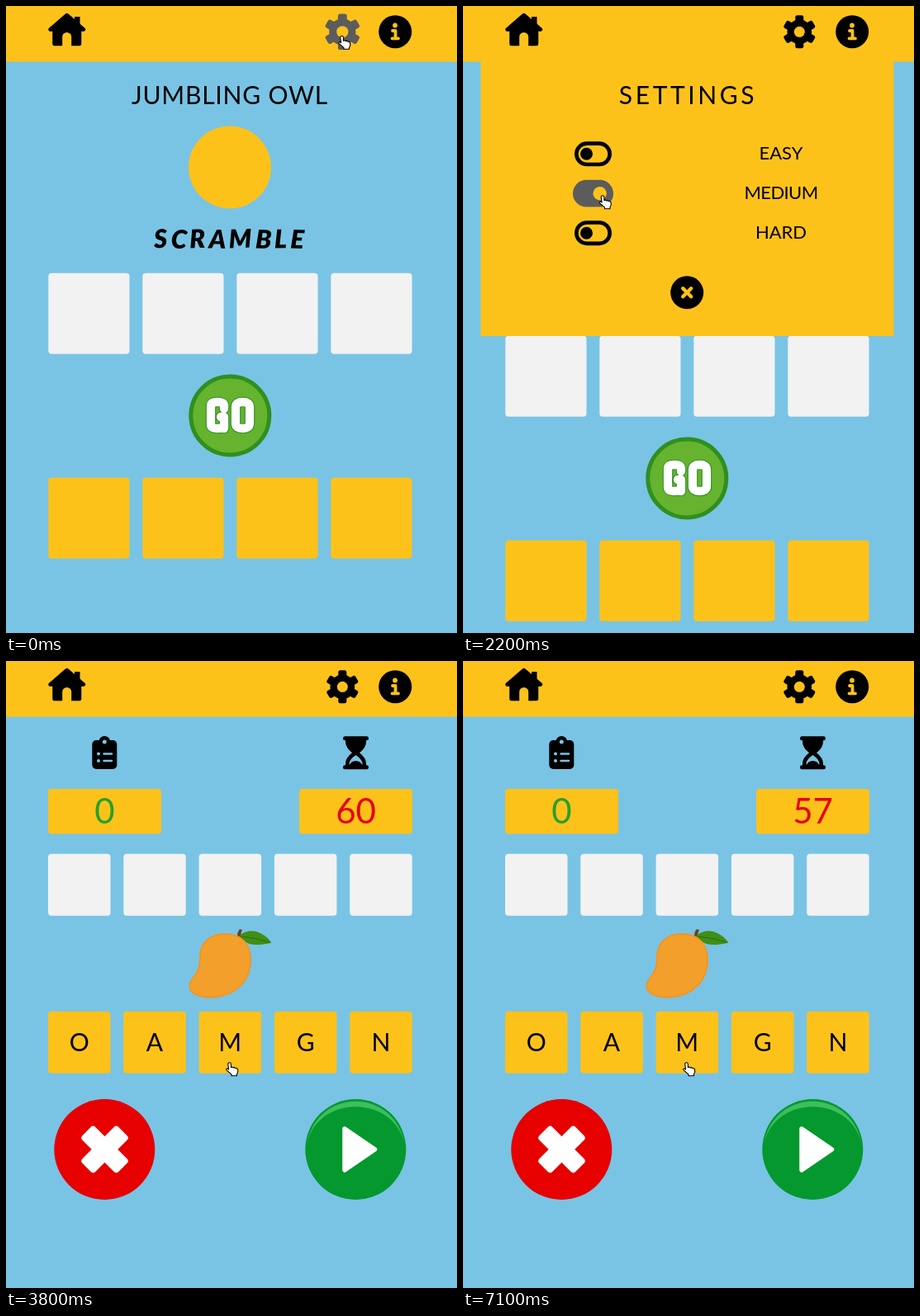
These frames come from a looping animation (546 by 760 pixels, 7200 ms). An HTML page:

```html
<!DOCTYPE html>
<html lang="en">
<head>
<meta charset="utf-8">
<title>Word scramble</title>
<style>
  html, body { margin: 0; width: 100%; height: 100%; overflow: hidden; background: #79c4e5; }
  svg { display: block; width: 546px; height: 760px; }
  text { font-family: Lato, "Open Sans", sans-serif; text-anchor: middle; }
  .amber { fill: #fdc21a; }
  .sky { fill: #79c4e5; }
  .pale { fill: #f2f2f2; }
  .heading { font-size: 30px; }
  .option { font-size: 22px; }
  .count { font-size: 42px; }
  .letter { font-size: 30px; }
  .brush { font-size: 31px; font-weight: 900; font-style: italic; letter-spacing: 3.9px; }
  .line { fill: none; stroke-linecap: round; stroke-linejoin: round; }
  .dim { color: #5c5c5c; }
</style>
</head>
<body>
<svg viewBox="0 0 546 760">
  <defs>
    <rect id="tooth" x="-5" y="-20" width="10" height="12" rx="2.5"/>
    <g id="gear" fill="currentColor">
      <circle r="14.8"/>
      <use href="#tooth"/>
      <use href="#tooth" transform="rotate(60)"/>
      <use href="#tooth" transform="rotate(120)"/>
      <use href="#tooth" transform="rotate(180)"/>
      <use href="#tooth" transform="rotate(240)"/>
      <use href="#tooth" transform="rotate(300)"/>
      <circle class="amber" r="6.5"/>
    </g>
    <g id="off">
      <rect class="line" x="-20.2" y="-12.7" width="40.4" height="25.4" rx="12.7" stroke="currentColor" stroke-width="4.6"/>
      <circle cx="-8" r="7.5" fill="currentColor"/>
    </g>
    <g id="on">
      <rect x="-22.5" y="-15" width="45" height="30" rx="15" fill="currentColor"/>
      <circle class="amber" cx="7.5" r="7.5"/>
    </g>
    <g id="close">
      <circle r="20" fill="currentColor"/>
      <path class="line" d="M-5-5 5 5M5-5-5 5" stroke="#fdc21a" stroke-width="4.4"/>
    </g>
    <rect id="big" width="98.2" height="98" rx="4"/>
    <g id="row">
      <use href="#big" x="51.3"/><use href="#big" x="165.3"/>
      <use href="#big" x="279.3"/><use href="#big" x="393.3"/>
    </g>
    <rect id="small" width="75.5" height="75" rx="4"/>
    <path id="go" class="line" d="M264 488v-3q0-5-8-5t-8 5v22q0 5 8 5t8-5v-9h-4M264 500v12M278 486q0-6 8.5-6t8.5 6v20q0 6-8.5 6t-8.5-6z"/>
    <g id="board">
      <use href="#row" class="pale" y="323.7"/>
      <circle cx="271.3" cy="496.5" r="47.5" fill="#65b32e" stroke="#2f8f1f" stroke-width="5"/>
      <use href="#go" stroke="#2f8f1f" stroke-width="12.5"/>
      <use href="#go" stroke="#fff" stroke-width="10.3"/>
      <use href="#row" class="amber" y="571.7"/>
    </g>
  </defs>

  <rect class="sky" width="546" height="760"/>
  <rect class="amber" width="546" height="67.6"/>

  <!-- Header icons -->
  <path d="M53.5 28.5 73.7 11 94 28.5h-5V46H58.5V28.5z" stroke="#000" stroke-width="4.5" stroke-linejoin="round"/>
  <path d="M83 13h6.5v12H83z"/>
  <path class="amber" d="M68.2 49V37.5a5.5 5.5 0 0 1 11 0V49z"/>
  <use href="#gear" transform="translate(407.3 31.3)" data-show="1500 7200"/>
  <use href="#gear" class="dim" transform="translate(407.3 31.3) scale(1.09)" data-show="0 1500"/>
  <circle cx="471.2" cy="31.2" r="20"/>
  <circle class="amber" cx="471" cy="23.5" r="2.9"/>
  <path class="line" d="M468 30h3.5v9.3M467.5 39.3h7.5" stroke="#fdc21a" stroke-width="3.8"/>

  <!-- Start screen -->
  <g data-show="0 3800">
    <text class="heading" x="271" y="119" letter-spacing=".8">JUMBLING OWL</text>
    <circle class="amber" cx="271" cy="195.5" r="50"/>
    <text class="brush" x="272" y="293.5" rotate="-3 2 -2 1 -2 2 -1 2">SCRAMBLE</text>
  </g>
  <use href="#board" data-show="0 1000 3000 3800"/>
  <use href="#board" y="76" data-show="1000 3000"/>

  <!-- Settings panel -->
  <g data-show="1000 3000">
    <rect class="amber" x="21.5" y="67" width="500" height="333"/>
    <text class="heading" x="272.5" y="119" letter-spacing="3.6">SETTINGS</text>
    <text class="option" x="385" y="186">EASY</text>
    <text class="option" x="385" y="234" letter-spacing="-.6">MEDIUM</text>
    <text class="option" x="385" y="282">HARD</text>
    <g transform="translate(157.5 179.3)">
      <use href="#on" data-show="0 2200"/>
      <use href="#off" data-show="2200 7200"/>
    </g>
    <g transform="translate(157.5 227.2)">
      <use href="#off" data-show="0 2000"/>
      <use href="#off" class="dim" transform="scale(1.09)" data-show="2000 2200"/>
      <use href="#on" class="dim" transform="scale(1.09)" data-show="2200 2500"/>
      <use href="#on" data-show="2500 7200"/>
    </g>
    <use href="#off" transform="translate(157.5 275.2)"/>
    <g transform="translate(271.2 347.3)">
      <use href="#close" data-show="0 2700"/>
      <use href="#close" class="dim" transform="scale(1.09)" data-show="2700 3000"/>
    </g>
  </g>

  <!-- Game screen -->
  <g data-show="3800 7200">
    <rect x="104.3" y="96" width="30" height="35" rx="5"/>
    <circle cx="119.3" cy="98" r="7"/>
    <g class="sky">
      <circle cx="119.3" cy="98" r="2.5"/>
      <circle cx="112" cy="112.5" r="2"/>
      <circle cx="112" cy="121" r="2"/>
    </g>
    <path class="line" d="M118.5 112.5h9.5M118.5 121h9.5" stroke="#79c4e5" stroke-width="2.4"/>

    <path class="line" d="M410.5 93.7h26M410.5 128.7h26" stroke="#000" stroke-width="5"/>
    <path d="M411 94h25v4q0 7-8 13.2 8 6.2 8 13.2v4h-25v-4q0-7 8-13.2-8-6.2-8-13.2z"/>
    <path class="sky" d="M415.5 126v-1.5q0-5 8-10.5 8 5.5 8 10.5v1.5l-3-3.5q-5-3-10 0z"/>

    <rect class="amber" x="51" y="155" width="137" height="54.5" rx="4"/>
    <rect class="amber" x="355" y="155" width="137" height="54.5" rx="4"/>
    <text class="count" x="119.5" y="197" fill="#28a02c">0</text>
    <text class="count" x="423.5" y="197" fill="#e60000" id="clock"></text>

    <g id="tiles"></g>

    <path d="M280 334q0-6 3-9l3 1q-2 4-2 8z" fill="#70401f"/>
    <path d="M282 333.5C291 324 309 324 321.5 341.5 304 346 290 345 282 333.5z" fill="#3f8f16"/>
    <path class="line" d="M284 334q18 1 35 7" stroke="#2c6c10"/>
    <path d="M235 358C235 342 247 331 265 331 286 331 296 344 296 362 296 390 275 408 246 407.5 228 407 220 400 223 390 227 381 235 379 235 358z" fill="#f2a02b" stroke="#f5941d" stroke-width="1.8"/>

    <circle cx="119.3" cy="592" r="61" fill="#e60000"/>
    <g transform="translate(119.5 592) rotate(45)" fill="#fff">
      <rect x="-31" y="-11.2" width="62" height="22.4" rx="4"/>
      <rect x="-11.2" y="-31" width="22.4" height="62" rx="4"/>
    </g>
    <circle cx="423.3" cy="592" r="61" fill="#05982e"/>
    <path d="M364.3 588A59.2 59.2 0 0 1 482.3 588 59.2 52 0 0 0 364.3 588z" fill="#3cbf5c"/>
    <path d="M410 567 446.5 592 410 617z" fill="#fff" stroke="#fff" stroke-width="5.5" stroke-linejoin="round"/>
  </g>

  <g id="cursor">
    <path d="M0-.2c1.2 0 1.900.8 1.900 1.900v4l1.500-.6 1.200.9 1.600-.4 1.100 1.100 1.500-.2 1.200 1.400.3 3-1.300 3v1.800H2.500v-1.600L-3.500 8.800c-.8-1 .3-2.200 1.600-1.500l1 .9-.9-6.500C-1.900.6-1.100-.2 0-.2z"
      fill="#fff" stroke="#000" stroke-width="1.1" stroke-linejoin="round" data-show="0 1500 2000 2500 2700 3000 3500 7200"/>
    <path d="M0 0V14l3.2-3 2.2 5 2.3-1-2.1-4.9H10z" stroke="#fff" stroke-width="1.4" paint-order="stroke"
      data-show="1500 2000 2500 2700 3000 3500"/>
  </g>
</svg>
<script>
  const LOOP = 7200, STEP = 100, GAME = 3800;

  document.getElementById('tiles').innerHTML = [...'OAMGN'].map((ch, i) => {
    const x = 51 + i * 91.3;
    return `<use href="#small" class="pale" x="${x}" y="233.7"/>
      <use href="#small" class="amber" x="${x}" y="424.7"/>
      <text class="letter" x="${x + 37.7}" y="472.5">${ch}</text>`;
  }).join('');

  // data-show holds pairs of start and end times
  const timed = [...document.querySelectorAll('[data-show]')].map(el => ({
    el, times: el.dataset.show.split(' ').map(Number)
  }));

  // time, x, y of the pointer tip
  const path = [
    [0, 406.5, 36.5], [1300, 406.5, 36.5], [2000, 169, 230], [2400, 169, 230],
    [2800, 271.5, 359], [3200, 271.5, 359], [3600, 270.5, 487], [LOOP, 270.5, 487]
  ];
  const cursor = document.getElementById('cursor');
  const clock = document.getElementById('clock');
  const mix = (a, b, k) => a + (b - a) * k;
  const ease = k => k * k * (3 - 2 * k);

  function draw(t) {
    for (const { el, times } of timed) {
      const passed = times.filter(at => at <= t).length;
      el.style.display = passed % 2 ? '' : 'none';
    }
    clock.textContent = 60 - Math.max(0, Math.floor((t - GAME) / 1000));

    const i = path.findIndex(p => p[0] > t);
    const a = path[i - 1], b = path[i];
    const k = ease((t - a[0]) / (b[0] - a[0]));
    cursor.setAttribute('transform', `translate(${mix(a[1], b[1], k)} ${mix(a[2], b[2], k)})`);
  }

  const start = performance.now();
  function tick() {
    const t = (performance.now() - start) % LOOP;
    draw(Math.floor(t / STEP) * STEP);
    requestAnimationFrame(tick);
  }
  tick();
</script>
</body>
</html>
```
